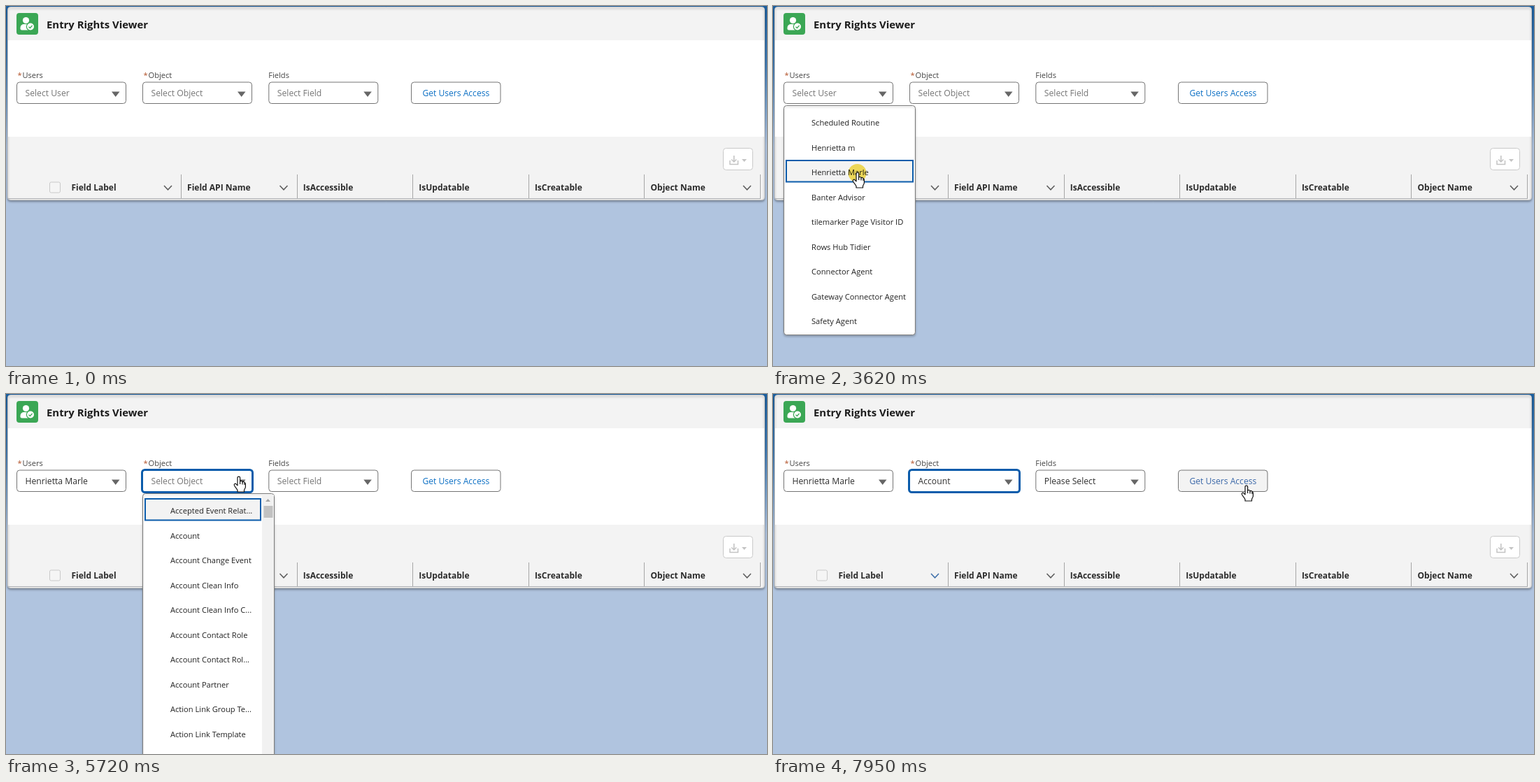
Recreate the animation shown at these times as an HTML page with a canvas. Size 1088 by 515 pixels, loop 7990 ms.

```html
<!DOCTYPE html>
<html lang="en">
<head>
<meta charset="utf-8">
<title>Entry Rights Viewer</title>
<style>
  html, body { margin: 0; width: 100%; height: 100%; overflow: hidden; background: #b0c4df; }
  canvas { display: block; width: 1088px; height: 515px; }
</style>
</head>
<body>
<canvas id="stage" width="1088" height="515"></canvas>
<script>
const ctx = document.getElementById('stage').getContext('2d');
const W = 1088, H = 515, LOOP = 7990;
const FONT = '"Open Sans", "Noto Sans", sans-serif';
const PERSON = 'Henrietta Marle';

const users = ['Scheduled Routine', 'Henrietta m', PERSON, 'Banter Advisor',
  'tilemarker Page Visitor ID', 'Rows Hub Tidier', 'Connector Agent',
  'Gateway Connector Agent', 'Safety Agent'];
const objects = ['Accepted Event Relat...', 'Account', 'Account Change Event',
  'Account Clean Info', 'Account Clean Info C...', 'Account Contact Role',
  'Account Contact Rol...', 'Account Partner', 'Action Link Group Te...',
  'Action Link Template'];

// start, end, steps, target x, target y
const moves = [
  [240, 990, 17, 144, 139],
  [1120, 1200, 3, 146, 117],
  [1530, 1570, 2, 152, 117],
  [2390, 2960, 14, 124, 228],
  [3290, 3370, 3, 121, 238],
  [3990, 4520, 14, 313, 137],
  [4730, 4930, 6, 328, 118],
  [5340, 5390, 2, 333, 118],
  [6010, 6620, 13, 299, 200],
  [7370, 7950, 15, 677, 131]
];
const presses = [[1860, 1980], [3620, 3740], [5550, 5680], [6990, 7160]];

const arrow = new Path2D('M0 0V16L3.8 12.6L6.4 18.4L8.9 17.3L6.4 11.6H11.3Z');
const hand = new Path2D('M-2 12.8V1.8C-2 -.5 1.6 -.5 1.6 1.8V7C2.6 6 5 6.4 5 8' +
  'C6 7 8 7.4 8 9C9 8.8 9.4 9.8 9.4 11V15C9.4 17 7.5 18 7.5 20V22H-2V20' +
  'C-2.5 18 -5 16 -6.6 12.8C-7.5 10.6 -5 9.6 -4 10.8Z');
const knuckles = new Path2D('M1.6 7V11M5 8V11.5M8 9V12');

const within = (t, a, b) => t >= a && t < b;
const ease = p => p * p * (3 - 2 * p);

function cursorAt(t) {
  let x = 825, y = 480;
  for (const [start, end, steps, tx, ty] of moves) {
    if (t < start) break;
    const step = Math.floor((t - start) / (end - start) * (steps - 1) + 1e-6) + 1;
    const p = ease(Math.min(1, step / steps));
    x += (tx - x) * p;
    y += (ty - y) * p;
  }
  return { x, y };
}

function text(str, x, y, size, color, weight = 400) {
  ctx.font = `${weight} ${size}px ${FONT}`;
  ctx.fillStyle = color;
  ctx.fillText(str, x, y);
}

function rect(x, y, w, h, color) {
  ctx.fillStyle = color;
  ctx.fillRect(x, y, w, h);
}

function box(x, y, w, h, r, fill, stroke, width = 1) {
  ctx.beginPath();
  ctx.roundRect(x, y, w, h, r);
  if (fill) { ctx.fillStyle = fill; ctx.fill(); }
  if (stroke) { ctx.strokeStyle = stroke; ctx.lineWidth = width; ctx.stroke(); }
}

function poly(points, fill, stroke, width = 1) {
  ctx.beginPath();
  points.forEach(([x, y]) => ctx.lineTo(x, y));
  if (fill) { ctx.fillStyle = fill; ctx.fill(); }
  if (stroke) { ctx.strokeStyle = stroke; ctx.lineWidth = width; ctx.stroke(); }
}

function disc(x, y, r, color) {
  ctx.beginPath();
  ctx.arc(x, y, r, 0, Math.PI * 2);
  ctx.fillStyle = color;
  ctx.fill();
}

function shadow(color, blur, dy) {
  ctx.shadowColor = color;
  ctx.shadowBlur = blur;
  ctx.shadowOffsetY = dy;
}

function drawBackdrop() {
  const sky = ctx.createLinearGradient(0, 0, 0, 200);
  sky.addColorStop(0, '#1b5f9e');
  sky.addColorStop(0.4, '#3f7ab3');
  sky.addColorStop(1, '#b0c4df');
  rect(0, 0, W, H, '#b0c4df');
  rect(0, 0, W, 200, sky);
  ctx.save();
  shadow('rgba(0,0,0,.3)', 3, 2);
  box(2.5, 1.5, 1082, 276, 4, '#f3f3f3', '#c9c9c9');
  ctx.restore();
  rect(3, 49, 1081, 138, '#fff');
}

function drawIcon() {
  box(15, 10, 31, 31, 4, '#3ba755');
  disc(28.5, 20.5, 4.6, '#fff');
  box(20.5, 26, 15, 8.5, [5, 5, 2, 2], '#fff');
  disc(35, 29.5, 6.2, '#3ba755');
  disc(35, 29.5, 5, '#fff');
  poly([[32.5, 29.6], [34.4, 31.5], [37.6, 27.9]], null, '#3ba755', 1.3);
}

function chevron(x, color) {
  poly([[x - 5.5, 257], [x, 262.8], [x + 5.5, 257]], null, color, 1.5);
}

function drawTable(t) {
  box(1025.5, 203.5, 42, 31, 4, '#fff', '#c9c9c9');
  poly([[1035, 221], [1035, 226.5], [1046.5, 226.5], [1046.5, 221]], null, '#c3c3c3', 1.5);
  poly([[1040.8, 214], [1040.8, 223]], null, '#c3c3c3', 1.6);
  poly([[1037.3, 219.5], [1040.8, 223], [1044.3, 219.5]], null, '#c3c3c3', 1.5);
  poly([[1052, 219], [1059, 219], [1055.5, 223]], '#c3c3c3');

  box(62.5, 252, 15, 15, 2, '#f5f5f5', '#c9c9c9');
  ['Field Label', 'Field API Name', 'IsAccessible', 'IsUpdatable', 'IsCreatable', 'Object Name']
    .forEach((label, i) => {
      text(label, 93.5 + i * 165.6, 264, 12, '#2b2b2b', 700);
      rect(Math.round(250 + i * 165.6), 241, 1, 35, '#a6a6a6');
    });
  chevron(231.5, t >= 7160 ? '#3d6ea8' : '#5c5c5c');
  chevron(397, '#5c5c5c');
  chevron(1059.5, '#5c5c5c');
  rect(3, 275, 1076, 1, '#aeb0b3');
}

function field(x, label, required, value, filled, focused) {
  if (required) text('*', x + 1.5, 103, 11.1, '#b4552d');
  text(label, x + (required ? 8.5 : 0), 102.5, 11.1, '#444');
  if (focused) box(x - 0.5, 108.5, 158, 32, 4, '#fff', '#0b5cab', 3);
  else box(x + 0.5, 109, 156, 30.5, 4, '#fff', '#747474');
  text(value, x + 12.5, 129, 12.2, filled ? '#2e2e2e' : '#757575');
  poly([[x + 136, 122.5], [x + 147.5, 122.5], [x + 141.7, 130]], '#666');
}

function drawMenu(x, items, height, highlightWidth, cursorY) {
  ctx.save();
  shadow('rgba(0,0,0,.2)', 3, 2);
  box(x + 0.5, 142.5, 188, height, 4, '#fff', '#7c7c7c');
  ctx.restore();
  const row = Math.max(0, Math.floor((cursorY - 147) / 35.5));
  box(x + 4, 150 + row * 35.5, highlightWidth, 30.5, 0, '#f3f3f3', '#0b5cab', 2);
  items.forEach((item, i) => text(item, x + 40, 171 + i * 35.5, 11.15, '#222'));
}

function drawScrollbar() {
  rect(366, 144, 17, H - 144, '#f1f1f1');
  poly([[371, 154], [378, 154], [374.5, 150]], '#a3a3a3');
  rect(368.5, 160, 13, 17, '#c1c1c1');
}

function drawCursor(x, y, pointing, pressed) {
  if (pressed) {
    ctx.save();
    ctx.globalCompositeOperation = 'multiply';
    disc(x - 0.5, y + 1, 13, '#f8e25c');
    ctx.restore();
  }
  ctx.save();
  ctx.translate(Math.round(x), Math.round(y));
  ctx.lineJoin = 'round';
  ctx.fillStyle = '#fff';
  ctx.strokeStyle = '#111';
  ctx.lineWidth = 1.2;
  const shape = pointing ? hand : arrow;
  ctx.fill(shape);
  ctx.stroke(shape);
  if (pointing) ctx.stroke(knuckles);
  ctx.restore();
}

function draw(t) {
  const { x, y } = cursorAt(t);
  const userMenu = within(t, 1980, 3740);
  const objectMenu = within(t, 5680, 7160);
  const userFocus = within(t, 1860, 3620) || within(t, 3740, 5550);
  const objectFocus = within(t, 5550, 6990) || t >= 7160;
  const hasUser = t >= 3740, hasObject = t >= 7160, hasFields = t >= 7560;
  const inRow = y > 109 && y < 140;
  const overButton = inRow && x > 580 && x < 707;
  const overField = inRow && [15, 195, 375].some(left => x > left && x < left + 157);

  drawBackdrop();
  drawIcon();
  text('Entry Rights Viewer', 58, 32, 14.9, '#1c1c1c', 700);
  field(15, 'Users', true, hasUser ? PERSON : 'Select User', hasUser, userFocus);
  field(195, 'Object', true, hasObject ? 'Account' : 'Select Object', hasObject, objectFocus);
  field(375.3, 'Fields', false, hasFields ? 'Please Select' : 'Select Field', hasFields, false);
  box(579.5, 109, 127.5, 30.5, 4, overButton ? '#f3f3f3' : '#fff', '#747474');
  text('Get Users Access', 595.5, 129, 12.1, overButton ? '#3a67a8' : '#0b6fc4');
  drawTable(t);

  if (userMenu) drawMenu(15, users, 328, 181, y);
  if (objectMenu) {
    drawMenu(195, objects, 400, 165, y);
    drawScrollbar();
  }
  if (t >= 240) {
    const pressed = presses.some(([a, b]) => within(t, a, b));
    drawCursor(x, y, userMenu || objectMenu || overField || overButton, pressed);
  }
}

function tick() {
  draw(performance.now() % LOOP);
  requestAnimationFrame(tick);
}
tick();
</script>
</body>
</html>
```
